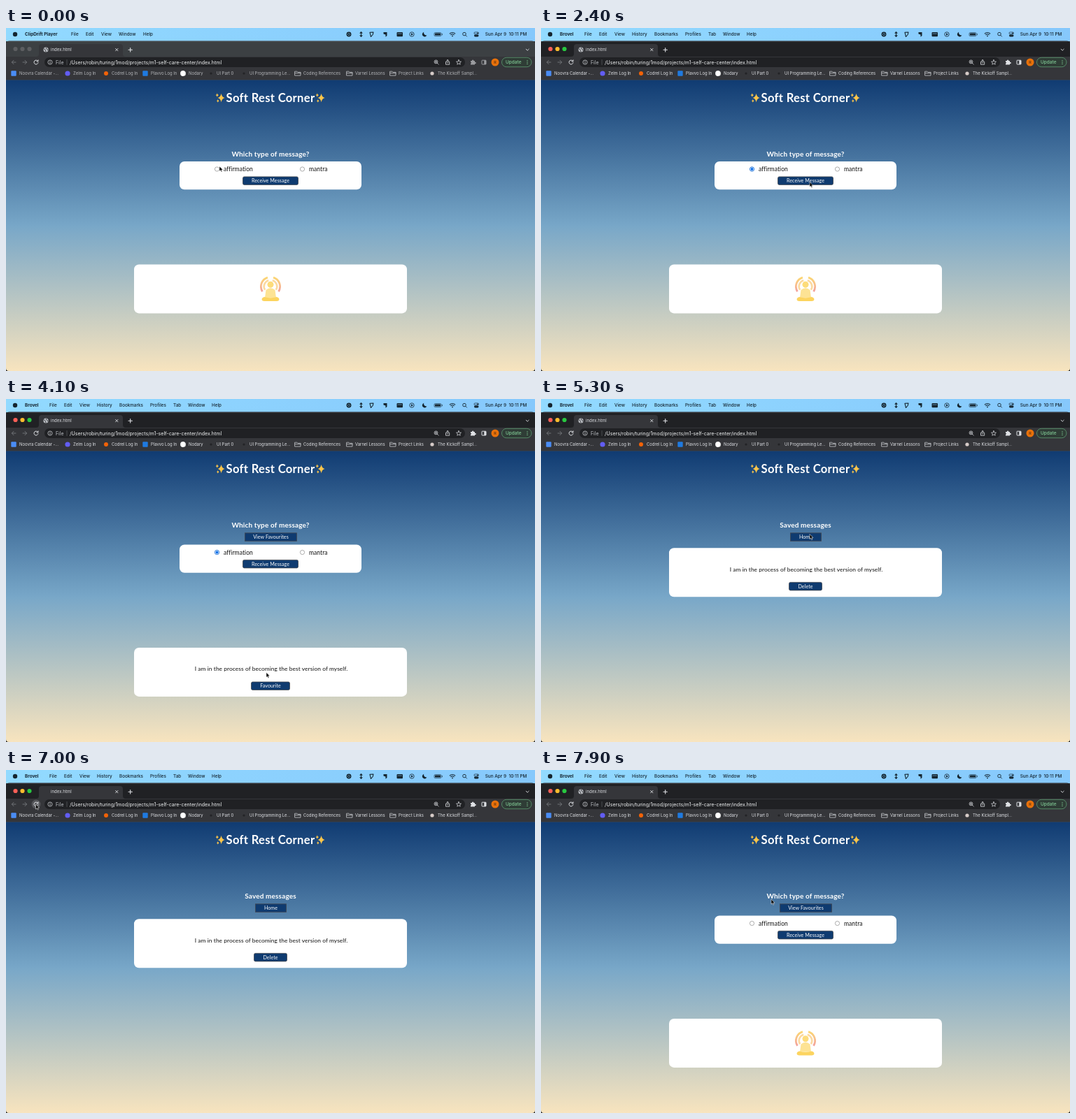
An HTML page that plays this animation: 756x491 px, repeating every 8000 ms.

```html
<!DOCTYPE html>
<html lang="en">
<head>
<meta charset="utf-8">
<title>Message picker</title>
<style>
  html, body { margin: 0; width: 100%; height: 100%; overflow: hidden; background: #35363a; }
  svg { display: block; width: 756px; height: 491px; }
  text { white-space: pre; font-family: Inter, "Liberation Sans", sans-serif; }
  .page text { font-family: Lato, "Open Sans", sans-serif; letter-spacing: .07px; }
  .line { fill: none; stroke-linecap: round; stroke-linejoin: round; }
</style>
</head>
<body>
<svg id="stage" viewBox="0 0 756 491"></svg>
<script>
const LOOP = 8000, STEP = 100;
const NAVY = '#0f3b70', INK = '#15252f', PALE = '#dfe1e5', BAR = '#35363a', SKY = '#8bcffd';

const text = (x, y, str, size, fill, extra = '') =>
  `<text x="${x}" y="${y}" font-size="${size}" fill="${fill}" ${extra}>${str}</text>`;
const rect = (x, y, w, h, r, fill, extra = '') =>
  `<rect x="${x}" y="${y}" width="${w}" height="${h}" rx="${r}" fill="${fill}" ${extra}/>`;
const circle = (x, y, r, fill, extra = '') =>
  `<circle cx="${x}" cy="${y}" r="${r}" fill="${fill}" ${extra}/>`;
const line = (d, color, width = .9, extra = '') =>
  `<path class="line" d="${d}" stroke="${color}" stroke-width="${width}" ${extra}/>`;
const group = (id, body, extra = '') => `<g id="${id}" ${extra}>${body}</g>`;
const centered = 'text-anchor="middle"';

const button = (x, y, w, label, r = 2) =>
  rect(x + .5, y + .5, w - 1, 11.5, r, NAVY, 'stroke="#43474f" stroke-width=".8"') +
  text(x + w / 2, y + 8.7, label, 7.1, '#fff', centered);

const star = (x, y, r) => {
  const k = r * .15;
  return `<path fill="#fbc54a" d="M${x} ${y - r}Q${x + k} ${y - k} ${x + r * .8} ${y}Q${x + k} ${y + k} ${x} ${y + r}` +
    `Q${x - k} ${y + k} ${x - r * .8} ${y}Q${x - k} ${y - k} ${x} ${y - r}"/>`;
};
const sparkles = x => star(x + 1.6, 100, 6.3) + star(x - 4.2, 96, 2.8) + star(x - 3.2, 104.4, 2.3);

const menu = items => items.map(([x, label], i) =>
  text(x, 11.4, label, i ? 6.3 : 6.35, INK, `font-weight="${i ? 500 : 700}"`)).join('');

function menuBar() {
  return rect(0, 0, 756, 19, 0, 'url(#menuTint)') + circle(13, 9, 3.2, INK) +
    group('menuIdle', menu([[27, 'ClipDrift Player'], [93, 'File'], [114, 'Edit'], [136, 'View'], [161, 'Window'], [196, 'Help']])) +
    group('menuActive', menu([[27, 'Brovel'], [62, 'File'], [83, 'Edit'], [105, 'View'], [130, 'History'],
      [162, 'Bookmarks'], [206, 'Profiles'], [239, 'Tab'], [260, 'Window'], [294, 'Help']])) +
    circle(490, 9, 2.6, 'none', `stroke="${INK}" stroke-width="1.7"`) + circle(490, 9, 1.2, INK) +
    line('M507.5 6V12M506 7.3L507.5 5.7L509 7.3M506 10.7L507.5 12.3L509 10.7', INK, 1.1) +
    line('M520 6.3L525 6L524.2 9.5L521.5 12.5Z', INK, 1.1) +
    `<path fill="${INK}" d="M539.5 6H544.5V11L542.5 12.8V9.5L539.5 8.5Z"/>` +
    rect(558.5, 6, 8.5, 6.3, 1, INK) + line('M560 8H565.5', SKY, .6) +
    circle(580, 9, 3.2, 'none', `stroke="${INK}" stroke-width=".8"`) +
    `<path fill="${INK}" d="M579 7.3L582 9L579 10.7Z"/>` +
    `<path fill="${INK}" d="M597.2 5.8A3.4 3.4 0 1 0 601.4 10.3A3.5 3.5 0 0 1 597.2 5.8"/>` +
    rect(612, 6.6, 10, 5, 1.4, 'none', `stroke="${INK}" stroke-width=".6"`) + rect(613, 7.6, 8, 3, .6, INK) +
    line('M623.3 8.3V9.9', INK, .7) +
    line('M634.3 8A5.2 5.2 0 0 1 641.7 8M635.8 9.7A3.1 3.1 0 0 1 640.2 9.7', INK, 1.1) + circle(638, 11.4, .9, INK) +
    circle(655, 8.6, 2.3, 'none', `stroke="${INK}" stroke-width=".9"`) + line('M656.8 10.4L658.5 12.1', INK) +
    rect(669, 6, 6.5, 2.6, 1.3, 'none', `stroke="${INK}" stroke-width=".7"`) + rect(669, 9.6, 6.5, 2.8, 1.4, INK) +
    circle(674, 7.3, .9, INK) +
    text(684.7, 11.4, 'Sun Apr 9  10:11 PM', 6.45, INK, 'font-weight="500"');
}

function tabStrip() {
  const lights = colors => colors.map((c, i) => circle(13.5 + i * 10, 30, 3.1, c)).join('');
  return `<path id="strip" d="M0 23.5Q0 18.5 5 18.5H751Q756 18.5 756 23.5V42H0Z"/>` +
    line('M4 19.2H752', '#5b5d61', .6) +
    group('lightsIdle', lights(['#5d5e61', '#5d5e61', '#5d5e61'])) +
    group('lightsActive', lights(['#fe5f57', '#febc2e', '#28c840'])) +
    `<path fill="${BAR}" d="M43 41Q47 41 47 37V27Q47 23 51 23H163Q167 23 167 27V37Q167 41 171 41Z"/>` +
    group('favicon', circle(57, 31, 3.6, '#b8bbc0') +
      line('M54 29.8Q56 30 56.2 31.4T57 34M57.6 28.3Q56.8 29.8 58.5 30.2T60 32', BAR, .9)) +
    text(64, 33.3, 'index.html', 6.1, PALE) +
    line('M156.6 29.4L160 32.8M160 29.4L156.6 32.8', PALE) +
    line('M175 31.2H180.4M177.7 28.5V33.9', PALE, 1.1) +
    line('M743.2 30.2L745.2 32.2L747.2 30.2', PALE);
}

function toolbar() {
  const dim = '#77797d';
  return rect(0, 41, 756, 33.5, 0, BAR) + rect(55, 42, 601, 14, 7, '#202124') +
    line('M14 49H8.5M11 46.3L8.3 49L11 51.7', dim) + line('M24 49H29.5M27 46.3L29.7 49L27 51.7', dim) +
    group('reloadHover', circle(43, 49, 6.4, '#56575b')) +
    line('M45.6 47.4A3 3 0 1 0 46 49.6M46 45.8V47.8H44', PALE, 1) +
    circle(63, 49, 3.1, 'none', `stroke="${PALE}" stroke-width=".7"`) + line('M63 48.8V50.5M63 47.4V47.5', PALE, .8) +
    text(71, 51.5, 'File', 6.9, '#bdc1c6') + line('M87 45.5V52.5', '#6b6d71', .6) +
    text(91, 51.5, '/Users/robin/turing/1mod/projects/m1-self-care-center/index.html', 7, '#f1f3f4') +
    circle(614.5, 48.4, 2.4, 'none', `stroke="${PALE}" stroke-width=".8"`) +
    line('M616.3 50.2L618.3 52.2M613.4 48.4H615.6M614.5 47.3V49.5', PALE, .7) +
    line('M629.6 48.3H628.5V52.2H633.7V48.3H632.6M631.1 50.2V45.6M629.6 47L631.1 45.5L632.6 47', PALE, .8) +
    line('M647 45.5L648 48L650.5 48.2L648.6 49.8L649.2 52.2L647 50.9L644.8 52.2L645.4 49.8L643.5 48.2L646 48Z', PALE, .7) +
    group('extras',
      `<path fill="${PALE}" d="M664 47H666A1.2 1.2 0 1 1 668.3 47H670V49A1.2 1.2 0 1 1 670 51V52.5H664V50.8A1.2 1.2 0 0 0 664 48.5Z"/>` +
      rect(680, 46.2, 6, 5.8, .6, 'none', `stroke="${PALE}"`) + rect(683.3, 46.2, 2.7, 5.8, 0, PALE)) +
    circle(699, 49, 5.5, '#e8710a') + text(699, 51, 'R', 5.4, '#3a2312', centered) +
    rect(708.5, 42.3, 42.5, 13.4, 6.7, '#2f3d36', 'stroke="#5e9c73" stroke-width=".8"') +
    text(714, 51.4, 'Update', 6.5, '#81c995', 'font-weight="500"') +
    [46.6, 49, 51.4].map(y => circle(745, y, .7, '#81c995')).join('');
}

function bookmarks() {
  const folder = x => line(`M${x} 62.2H${x + 3}L${x + 4} 63.3H${x + 8}V68H${x}ZM${x} 64.6H${x + 8}`, '#c4c7cc', .8);
  const square = (x, color) => rect(x - 3.7, 61.3, 7.4, 7.4, 1, color);
  const labels = [[19, 'Noovra Calendar -...'], [96, 'Zelm Log In'], [151, 'Codrel Log In'], [207, 'Plavvo Log In'],
    [261, 'Nodary'], [301, 'UI Part 0'], [348, 'UI Programming Le...'], [425, 'Coding References'],
    [499, 'Varnel Lessons'], [561, 'Project Links'], [617, 'The Kickoff Sampl...']];
  return square(11, '#4a8df5') + circle(88, 65, 3.6, '#625df5') + circle(143, 65, 3, '#f26207') +
    square(199, '#1f7ae0') + circle(253, 65, 3.9, '#fff') + circle(293, 65, 1.6, '#222326') +
    circle(340, 65, 1.6, '#222326') + folder(413) + folder(487) + folder(549) + circle(609, 65, 2.6, '#d6cbc8') +
    group('labels', labels.map(([x, label]) => text(x, 67.2, label, 5.9, PALE)).join('')) +
    rect(0, 74, 756, .6, 0, '#4a4d52');
}

function meditator() {
  const arc = (r, color, w, s) => line(
    `M${378 + s * r * .85} ${370 + r * .53}A${r} ${r} 0 0 ${s < 0 ? 1 : 0} ${378 + s * r * .3} ${370 - r * .95}`, color, w,
    'style="stroke-linecap:butt"');
  return [-1, 1].map(s => arc(13.6, 'url(#glow)', 2.8, s) + arc(9.3, '#fbd9a0', 2.6, s)).join('') +
    circle(378, 367.3, 4.5, '#fddc7a') +
    `<path fill="#fde394" d="M371.5 375Q378 369.5 384.5 375L386 386H370Z"/>` +
    `<path fill="#fcd45f" d="M369 385Q365.3 386 365.6 389Q366 391 369 391H387Q390 391 390.4 389Q390.7 386 387 385Q378 387.5 369 385Z"/>`;
}

function page() {
  const radio = x => circle(x, 202, 3.1, '#fff', 'stroke="#767676" stroke-width=".6"');
  const label = (x, s) => text(x, 205.2, s, 8.5, '#111');
  const message = y => text(379, y, 'I am in the process of becoming the best version of myself.', 8.4, '#111', centered);
  const heading = s => text(378, 183.6, s, 10, '#fff', `${centered} font-weight="700" style="letter-spacing:.15px"`);
  return rect(0, 74.5, 756, 417, 0, 'url(#sky)') +
    sparkles(306) + sparkles(449) +
    text(378, 105.7, 'Soft Rest Corner', 16.6, '#fff', `${centered} font-weight="700" style="letter-spacing:.3px"`) +
    group('home', heading('Which type of message?') +
      group('viewSaved', button(341, 191.3, 75, 'View Favourites', 0)) +
      group('panels',
        rect(248, 191, 260, 40.3, 7, '#fff') + radio(301.5) + radio(423.5) +
        group('checked', circle(301.5, 202, 3.1, '#fff', 'stroke="#0d6fe8" stroke-width=".8"') + circle(301.5, 202, 1.9, '#0d6fe8')) +
        label(311, 'affirmation') + label(433, 'mantra') +
        button(338, 212.4, 80, 'Receive Message') +
        rect(183, 338.4, 390, 70, 7, '#fff') + group('icon', meditator()) +
        group('received', message(371.8) + button(350, 387, 56, 'Favourite')))) +
    group('saved', heading('Saved messages') + button(356, 191.3, 45, 'Home', 0) +
      rect(183, 213.2, 390, 70, 7, '#fff') + message(246.8) + button(354, 261.9, 48, 'Delete'));
}

const stage = document.getElementById('stage');
stage.innerHTML = `<defs>
  <linearGradient id="menuTint"><stop stop-color="#92daff"/><stop offset="1" stop-color="#86c8fc"/></linearGradient>
  <linearGradient id="sky" x2="0" y2="1"><stop stop-color="#103b72"/><stop offset=".5" stop-color="#78a7c8"/><stop offset="1" stop-color="#f8e4be"/></linearGradient>
  <linearGradient id="glow" x2="0" y2="1"><stop stop-color="#fbd672"/><stop offset=".5" stop-color="#f8c08c"/><stop offset="1" stop-color="#f2a09c"/></linearGradient>
  </defs>` + menuBar() + tabStrip() + toolbar() + bookmarks() + `<g class="page">${page()}</g>` +
  `<path fill="#1a1c20" d="M0 487Q0 491 4 491H0ZM756 487Q756 491 752 491H756Z"/>` +
  group('cursor', '<path d="M0 0V7.1L1.6 5.6L2.7 8.1L3.9 7.6L2.8 5.1H5Z" fill="#000" stroke="#fff" stroke-width=".5"/>');

const el = Object.fromEntries([...stage.querySelectorAll('[id]')].map(n => [n.id, n]));
const show = (id, on) => el[id].setAttribute('display', on ? 'inline' : 'none');

const AT = { focus: 100, check: 1500, receive: 2600, favourite: 4000, view: 5300, reload: 7000, reloaded: 7100 };

const smooth = u => u * u * (3 - 2 * u);
const steady = u => u;

// start, end, target x, target y, easing
const moves = [
  [0, 300, 301, 201.5, smooth],
  [1900, 2400, 384, 220.5, smooth],
  [3000, 3800, 372, 391.5, smooth],
  [4400, 5100, 384, 193.5, smooth],
  [6000, 6900, 42.5, 49, smooth],
  [7300, 7800, 271.5, 221, steady],
  [7800, 7900, 329, 185, steady],
];

function cursorAt(t) {
  let x = 305, y = 198;
  for (const [start, end, toX, toY, ease] of moves) {
    const k = ease(Math.min(1, Math.max(0, (t - start) / (end - start))));
    x += (toX - x) * k;
    y += (toY - y) * k;
  }
  return [x, y];
}

function draw(ms) {
  const t = Math.floor(ms / STEP) * STEP;
  const active = t >= AT.focus, reloaded = t >= AT.reloaded;
  const saved = t >= AT.view && !reloaded, favourited = t >= AT.favourite;
  const received = t >= AT.receive && !reloaded;

  show('menuIdle', !active);
  show('menuActive', active);
  show('lightsIdle', !active);
  show('lightsActive', active);
  el.strip.setAttribute('fill', active ? '#202124' : '#3c4043');
  el.extras.setAttribute('opacity', active ? 1 : .6);
  el.labels.setAttribute('opacity', active ? 1 : .75);
  show('favicon', t < AT.reload || t >= AT.reloaded + 100);
  show('reloadHover', t >= 6800 && t < 7400);

  show('home', !saved);
  show('saved', saved);
  show('viewSaved', favourited);
  el.panels.setAttribute('transform', `translate(0 ${favourited ? 17.5 : 0})`);
  show('checked', t >= AT.check && !reloaded);
  show('icon', !received);
  show('received', received);

  el.cursor.setAttribute('transform', `translate(${cursorAt(t)})`);
}

function tick() {
  draw(performance.now() % LOOP);
  requestAnimationFrame(tick);
}
tick();
</script>
</body>
</html>
```
